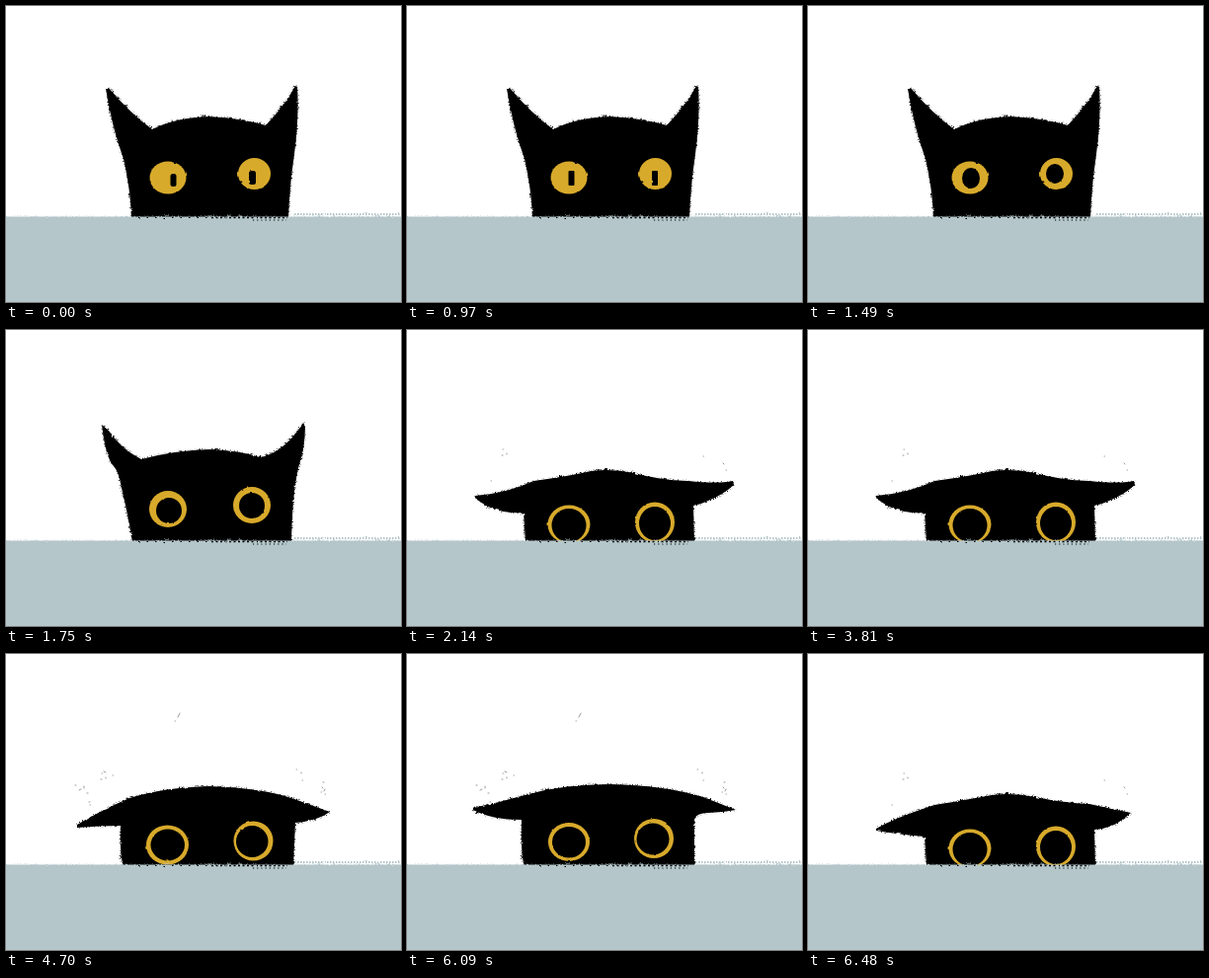
These frames come from a looping animation (400x300 px, 8480 ms). An HTML page without scripts:

```html
<!DOCTYPE html>
<html lang="en">
<head>
<meta charset="utf-8">
<title>Cat behind a table</title>
<style>
html, body { margin: 0; width: 100%; height: 100%; overflow: hidden; background: #fff; }
svg { display: block; width: 100vw; height: 100vh; }
.body, .iris, .pupil, .specks path { animation: 8.48s step-end infinite; }
.iris { fill: #d8aa2b; }
.specks, .crumbs { fill: none; stroke: #000; }
.specks path { stroke-width: .8; stroke-linecap: round; opacity: .5; }
.body { animation-name: body; }
.iris.l { animation-name: iris-l; }
.iris.r { animation-name: iris-r; }
.pupil.l { animation-name: pupil-l; }
.pupil.r { animation-name: pupil-r; }
.specks .few { animation-name: few; }
.specks .many { animation-name: many; }

/* ears up, drooping, then flat and shivering */
@keyframes body {
  0% { d: path("M101 84L104 83Q125 108 148 125Q172 113 206 112Q240 114 263 121Q282 101 293 81L295 82Q297 112 292 150Q287 185 286 215H127Q126 185 119 155Q107 122 101 84Z"); }
  19.1% { d: path("M99 90L103 92Q122 114 142 128Q168 118 206 116Q238 119 260 125Q282 110 298 88L300 89Q299 117 294 148Q289 185 288 215H128Q126 185 118 158Q105 128 99 90Z"); }
  20.63% { d: path("M97 96L104 102Q117 121 137 131Q170 122 206 121Q237 122 257 129Q281 125 301 94L303 97Q303 120 296 140Q290 165 289 215H128Q124 190 117 160Q114 143 109 138Q101 130 97 96Z"); }
  22.16% { d: path("M80 128Q100 136 128 136Q165 127 206 126Q240 127 262 134Q295 136 320 124Q318 140 293 155Q289 180 290 215H121Q119 185 115 160Q90 150 80 128Z"); }
  23.7%, 56.95%, 71.81% { d: path("M67 156Q95 150 123 142Q160 132 206 132Q260 133 300 145L333 158Q318 161 304 161Q291 162 291 168L291 215H119Q115 205 116 168Q85 168 67 158Z"); }
  55.42%, 73.34% { d: path("M72 173Q95 159 125 146Q160 135 206 134Q262 136 292 147L328 160Q316 169 293 171L291 215H119Q115 205 116 174Q95 174 72 176Z"); }
  25.23%, 31.36%, 35.96%, 74.88% { d: path("M69 168Q103 165 128 153Q165 148 186 143Q206 140 230 145Q255 152 285 153Q315 156 330 153L331 157Q320 167 305 173Q297 177 290 178L291 215H120L118 185Q88 187 69 170Z"); }
  28.3%, 32.9%, 58.49%, 76.41% { d: path("M69 177Q88 166 128 153Q165 147 186 143Q206 140 230 145Q260 151 285 152L327 161Q313 173 305 175Q297 178 290 178L291 215H120L118 185Q95 183 69 179Z"); }
}
@keyframes iris-l {
  0% { cx: 164px; cy: 174px; rx: 18.5px; ry: 16.5px; }
  19.1% { cx: 164px; cy: 178px; rx: 19px; ry: 17.5px; }
  20.63% { cx: 164px; cy: 181.5px; rx: 19px; ry: 18.5px; }
  22.16% { cx: 164px; cy: 186px; rx: 20px; ry: 19px; }
  23.7%, 56.95%, 71.81% { cx: 164px; cy: 190.5px; rx: 21px; ry: 19.5px; }
  55.42%, 73.34% { cx: 163.5px; cy: 193.5px; rx: 21.5px; ry: 20px; }
  25.23%, 58.49%, 74.88% { cx: 164px; cy: 197px; rx: 21.5px; ry: 19.5px; }
}
@keyframes iris-r {
  0% { cx: 251.5px; cy: 170px; rx: 16.5px; ry: 16px; }
  19.1% { cx: 250px; cy: 174px; rx: 17.5px; ry: 17px; }
  20.63% { cx: 249px; cy: 177.5px; rx: 19px; ry: 18.5px; }
  22.16% { cx: 250px; cy: 182px; rx: 19.5px; ry: 19px; }
  23.7%, 56.95%, 71.81% { cx: 250px; cy: 187px; rx: 20px; ry: 20px; }
  55.42%, 73.34% { cx: 250.5px; cy: 189.5px; rx: 20px; ry: 20px; }
  25.23%, 58.49%, 74.88% { cx: 251px; cy: 195px; rx: 20px; ry: 20.5px; }
}
/* glance right, left, centre, then widen */
@keyframes pupil-l {
  0% { x: 166.5px; y: 170px; width: 6px; height: 13px; rx: 2.5px; }
  6.13% { x: 172px; y: 170px; width: 6px; height: 13px; rx: 2.5px; }
  7.66% { x: 155.5px; y: 169px; width: 6px; height: 14px; rx: 2.5px; }
  11.43% { x: 163.5px; y: 167px; width: 6px; height: 15px; rx: 1px; }
  16.03% { x: 160px; y: 166px; width: 12px; height: 17px; rx: 99px; }
  17.57% { x: 156px; y: 164px; width: 18px; height: 21px; rx: 99px; }
  19.1% { x: 153px; y: 167px; width: 22px; height: 23px; rx: 99px; }
  20.63% { x: 152px; y: 170px; width: 26px; height: 26px; rx: 99px; }
  22.16% { x: 149px; y: 172px; width: 30px; height: 30px; rx: 99px; }
  23.7%, 56.95%, 71.81% { x: 147px; y: 175px; width: 34px; height: 31.5px; rx: 99px; }
  55.42%, 73.34% { x: 146.5px; y: 177.5px; width: 34.5px; height: 32px; rx: 99px; }
  25.23%, 34.43%, 44.92%, 58.49%, 74.88% { x: 146.5px; y: 181px; width: 35px; height: 34px; rx: 99px; }
  32.9%, 35.96% { x: 149.5px; y: 182px; width: 34px; height: 36px; rx: 99px; }
}
@keyframes pupil-r {
  0% { x: 246px; y: 167px; width: 7px; height: 14px; rx: 2.5px; }
  6.13% { x: 256px; y: 167px; width: 7px; height: 14px; rx: 2.5px; }
  7.66% { x: 239px; y: 167px; width: 6px; height: 14px; rx: 2.5px; }
  11.43% { x: 248px; y: 167px; width: 6px; height: 15px; rx: 1px; }
  16.03% { x: 245px; y: 163px; width: 12px; height: 17px; rx: 99px; }
  17.57% { x: 241px; y: 160px; width: 18px; height: 20px; rx: 99px; }
  19.1% { x: 239px; y: 163px; width: 21px; height: 22px; rx: 99px; }
  20.63% { x: 236px; y: 165px; width: 26px; height: 26px; rx: 99px; }
  22.16% { x: 235px; y: 167px; width: 30px; height: 30px; rx: 99px; }
  23.7%, 56.95%, 71.81% { x: 232.5px; y: 171.5px; width: 33px; height: 32px; rx: 99px; }
  55.42%, 73.34% { x: 233px; y: 174px; width: 32.5px; height: 32px; rx: 99px; }
  25.23%, 34.43%, 44.92%, 58.49%, 74.88% { x: 235px; y: 179px; width: 32px; height: 34px; rx: 99px; }
  32.9%, 35.96% { x: 237px; y: 180px; width: 31px; height: 33px; rx: 99px; }
}
@keyframes few {
  0% { visibility: hidden; }
  23.7% { visibility: visible; }
}
@keyframes many {
  0%, 25.23%, 58.49%, 74.88% { visibility: hidden; }
  23.7%, 55.42%, 71.81% { visibility: visible; }
}
</style>
</head>
<body>
<svg viewBox="0 0 400 300" preserveAspectRatio="none">
  <defs>
    <filter id="rough" filterUnits="userSpaceOnUse" x="-10" y="0" width="420" height="310" color-interpolation-filters="sRGB">
      <feTurbulence type="fractalNoise" baseFrequency=".16" numOctaves="2" seed="4"/>
      <feDisplacementMap in="SourceGraphic" scale="2" xChannelSelector="R" yChannelSelector="G"/>
    </filter>
    <filter id="ink" filterUnits="userSpaceOnUse" x="-10" y="0" width="420" height="310" color-interpolation-filters="sRGB">
      <feTurbulence type="fractalNoise" baseFrequency=".2" numOctaves="2" seed="7" result="wobble"/>
      <feDisplacementMap in="SourceGraphic" in2="wobble" scale="2.2" xChannelSelector="R" yChannelSelector="G" result="shape"/>
      <feMorphology operator="dilate" radius="1.2" result="halo"/>
      <feTurbulence type="fractalNoise" baseFrequency=".7" numOctaves="2" seed="11"/>
      <feColorMatrix values="0 0 0 0 0  0 0 0 0 0  0 0 0 0 0  6 0 0 0 -3.3" result="grain"/>
      <feComposite in="halo" in2="grain" operator="in" result="dust"/>
      <feMerge><feMergeNode in="dust"/><feMergeNode in="shape"/></feMerge>
    </filter>
  </defs>
  <rect width="400" height="300" fill="#fff"/>
  <g class="specks">
    <path class="few" d="M96 127h1M101 125v1M97 121h.5M300 128h.5M320 135l1 1M323 142h.5M85 153h.5"/>
    <path class="many" d="M174 64l2-4M171 68h.5M70 133h1M74 138l2-1M79 134v2M82 141h1M99 119l2 1M108 123h.5M299 120v1M294 117h.5M321 130h1M323 137l-1 2M319 140h.5M84 150h1"/>
  </g>
  <g filter="url(#ink)"><path class="body"/></g>
  <g filter="url(#rough)">
    <ellipse class="iris l"/>
    <ellipse class="iris r"/>
    <rect class="pupil l"/>
    <rect class="pupil r"/>
  </g>
  <rect x="-10" y="213.5" width="420" height="100" fill="#b4c6ca" filter="url(#ink)"/>
  <g class="crumbs" filter="url(#rough)">
    <path d="M292 211H400" stroke="#b4c6ca" stroke-width="2" stroke-dasharray="1.5 1.5"/>
    <path d="M208 214.5H285" stroke-width="1.4" stroke-dasharray="2 2.5"/>
    <path d="M250 217H284" stroke-width="1" stroke-dasharray="1.2 3"/>
    <path d="M134 214.5H206" stroke-width="1" stroke-dasharray="1.5 7"/>
  </g>
</svg>
</body>
</html>
```
